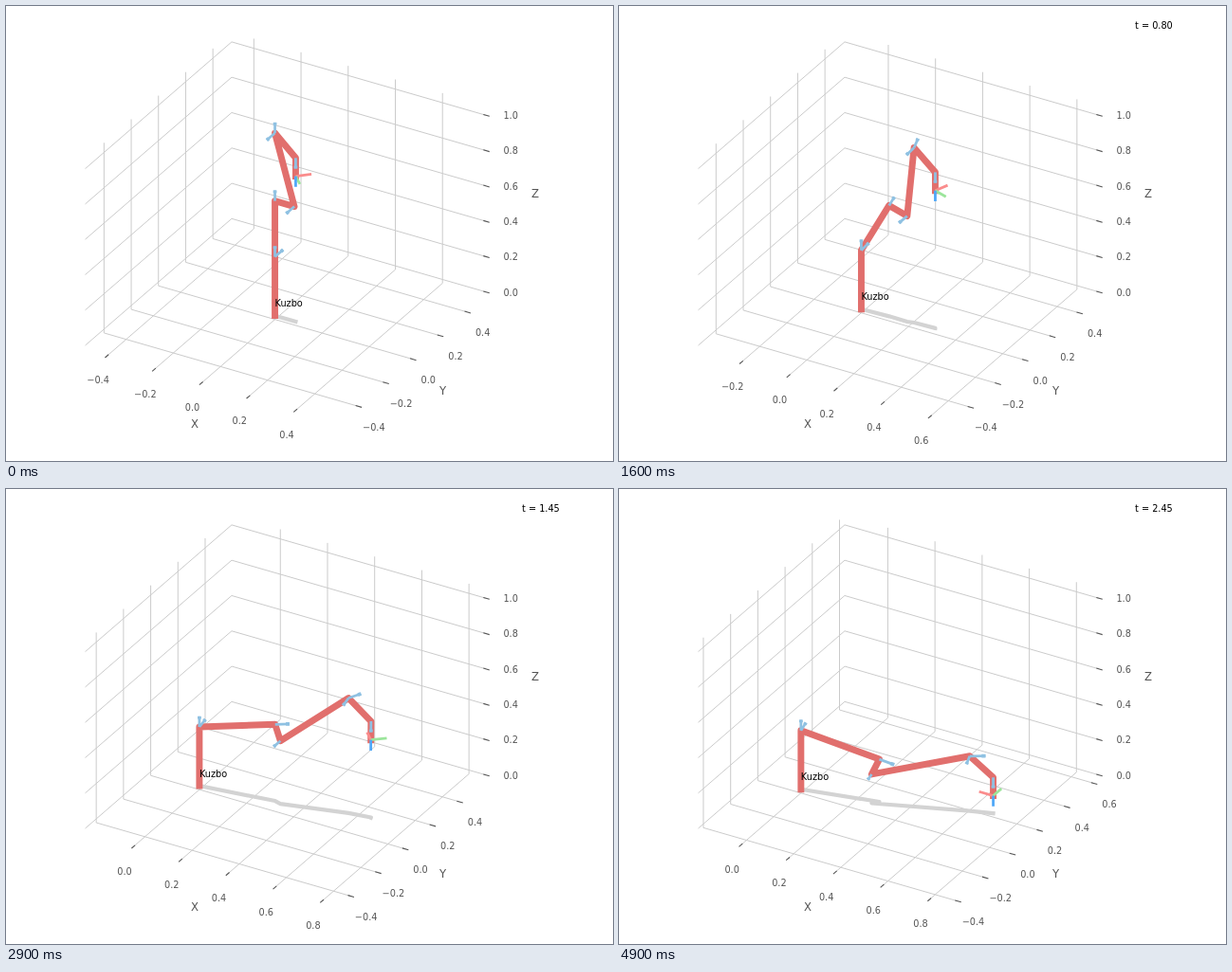
Animation, 640 px wide and 480 px high, one loop 5000 ms. Source, as an HTML page:

```html
<!DOCTYPE html>
<html lang="en">
<head>
<meta charset="utf-8">
<title>Robot arm plot</title>
<style>
  html, body { margin: 0; width: 100%; height: 100%; overflow: hidden; background: #fff; }
  svg { display: block; width: 640px; height: 480px; }
  text { font-family: "DejaVu Sans", sans-serif; font-size: 9.72px; }
  path { fill: none; }
  .grid { stroke: #cbcbcb; stroke-width: 1; }
  .tick { stroke: #555; stroke-width: 1.1; }
  .label { fill: #555; text-anchor: middle; }
  .axis { font-size: 11.67px; }
  .shadow { stroke: #d3d3d3; stroke-width: 4.17; stroke-linejoin: round; stroke-linecap: square; }
  .arm { stroke: #e16f6d; stroke-width: 6.94; stroke-linejoin: round; stroke-linecap: square; }
  .arrow { stroke-width: 2.78; }
  .tip { stroke-width: 3.8; }
</style>
</head>
<body>
<svg id="stage" viewBox="0 0 640 480"></svg>
<script>
const STEPS = 50, STEP_MS = 100, DT = 0.05;
const HEIGHT = 1.033;             // tallest reach sets the size of the cube
const HALF = HEIGHT / 2;
const PAD = HALF * 25 / 24;       // walls stand a little outside the limits
const SCALE = 296.52 / HEIGHT;
const C30 = Math.cos(Math.PI / 6);
const CENTER = [294.49, 233.51];
const ARROW = 0.06;
const JOINT_COLOR = '#8fc1e2';
const TOOL_COLORS = ['#fa8c8c', '#9be59b', '#4fa8f8'];

// Joint rows: link twist (quarter turns), link length, link offset, final angle
const JOINTS = [
  [0, 0, 0.333, 0.2134],
  [-1, 0, 0, 1.867],
  [1, 0, 0.316, -0.2264],
  [1, 0.0825, 0, 0.4825],
  [-1, -0.0825, 0.384, 0.2198],
  [1, 0, 0, 1.396],
  [1, 0.088, 0.107, -2.037]
];

const add = (a, b, k) => a.map((v, i) => v + b[i] * k);
const mix = (a, b, angle) => {
  const c = Math.cos(angle), s = Math.sin(angle);
  return [a.map((v, i) => c * v + s * b[i]), a.map((v, i) => c * b[i] - s * v)];
};

function nextFrame({ p, x, y, z }, [twist, length, offset], angle) {
  [y, z] = mix(y, z, twist * Math.PI / 2);
  p = add(p, x, length);
  [x, y] = mix(x, y, angle);
  return { p: add(p, z, offset), x, y, z };
}

function pose(k) {
  const u = k / (STEPS - 1);
  const s = u ** 3 * (10 - 15 * u + 6 * u * u);
  let f = { p: [0, 0, 0], x: [1, 0, 0], y: [0, 1, 0], z: [0, 0, 1] };
  const frames = [f];
  for (const row of JOINTS) frames.push(f = nextFrame(f, row, row[3] * s));
  frames.push(nextFrame(f, [0, 0, 0.1034], -Math.PI / 4));
  return frames;
}

// The view follows the extent of everything visited so far
const poses = [], mids = [];
const low = [0, 0], high = [0, 0];
for (let k = 0; k < STEPS; k++) {
  poses.push(pose(k));
  for (const { p } of poses[k]) {
    for (const i of [0, 1]) {
      low[i] = Math.min(low[i], p[i]);
      high[i] = Math.max(high[i], p[i]);
    }
  }
  mids.push([(low[0] + high[0]) / 2, (low[1] + high[1]) / 2, HALF]);
}

const path = (cls, pts, color) =>
  `<path class="${cls}"${color ? ` stroke="${color}"` : ''} d="M${
    pts.map(p => p.map(v => v.toFixed(2)).join(' ')).join('L')}"/>`;

const label = (cls, x, y, text) =>
  `<text class="${cls}" x="${x.toFixed(2)}" y="${y.toFixed(2)}">${text}</text>`;

const number = v => Math.abs(v).toFixed(1).replace(/^/, v < -0.01 ? '\u2212' : '');

function ticks(mid) {
  const list = [];
  for (let i = Math.ceil((mid - HALF) * 5); i <= (mid + HALF) * 5; i++) list.push(i / 5);
  return list;
}

function draw(k) {
  const mid = mids[k], frames = poses[k];
  const [x0, y0, z0] = mid.map(m => m - PAD);
  const [x1, y1, z1] = mid.map(m => m + PAD);
  const at = p => {
    const [x, y, z] = p.map((v, i) => (v - mid[i]) * SCALE);
    return [CENTER[0] + x * C30 + y / 2,
            CENTER[1] + x / 4 - y * C30 / 2 - z * 0.75 * C30];
  };
  const line = (cls, pts, color) => path(cls, pts.map(at), color);
  let grid = '', marks = '';

  // One tick: grid line over two walls, mark across the edge, number beside it
  function tick(wall, edge, dir, dx, dy, value) {
    grid += line('grid', wall);
    const out = HEIGHT / 12;
    marks += line('tick', [add(edge, dir, -0.1 * out), add(edge, dir, 0.2 * out)]);
    const [x, y] = at(edge);
    marks += label('label', x + dx, y + dy + 3.6, number(value));
  }
  for (const v of ticks(mid[0]))
    tick([[v, y0, z0], [v, y1, z0], [v, y1, z1]], [v, y0, z0], [0, -1, 0], -9.8, 26, v);
  for (const v of ticks(mid[1]))
    tick([[x1, v, z0], [x0, v, z0], [x0, v, z1]], [x1, v, z0], [1, 0, 0], 17, 21.8, v);
  for (const v of ticks(mid[2]))
    tick([[x0, y0, v], [x0, y1, v], [x1, y1, v]], [x1, y1, v], [1, 0, 0], 26.7, 0.4, v);

  marks += label('label axis', 199, 445, 'X')
    + label('label axis', 460.5, 410, 'Y')
    + label('label axis', 558, 202, 'Z');

  const points = frames.map(f => f.p);
  let robot = line('shadow', points.map(([x, y]) => [x, y, 0])) + line('arm', points);
  const arrow = (p, dir, color) => line('arrow', [p, add(p, dir, ARROW)], color);
  for (const f of frames.slice(1, -1)) {
    robot += arrow(f.p, f.z, JOINT_COLOR)
      + line('tip', [add(f.p, f.z, ARROW * 0.75), add(f.p, f.z, ARROW)], JOINT_COLOR);
  }
  const tool = frames[frames.length - 1];
  [tool.x, tool.y, tool.z].forEach((dir, i) => { robot += arrow(tool.p, dir, TOOL_COLORS[i]); });

  const name = at([0, 0, 0.05]);
  robot += label('', name[0], name[1], 'Kuzbo');
  if (k) robot += label('', 544, 24, 't = ' + (k * DT).toFixed(2));
  return grid + marks + robot;
}

const stage = document.getElementById('stage');
const start = performance.now();
let shown = -1;

function play() {
  const k = Math.floor((performance.now() - start) / STEP_MS) % STEPS;
  if (k !== shown) stage.innerHTML = draw(shown = k);
  requestAnimationFrame(play);
}
play();
</script>
</body>
</html>
```
